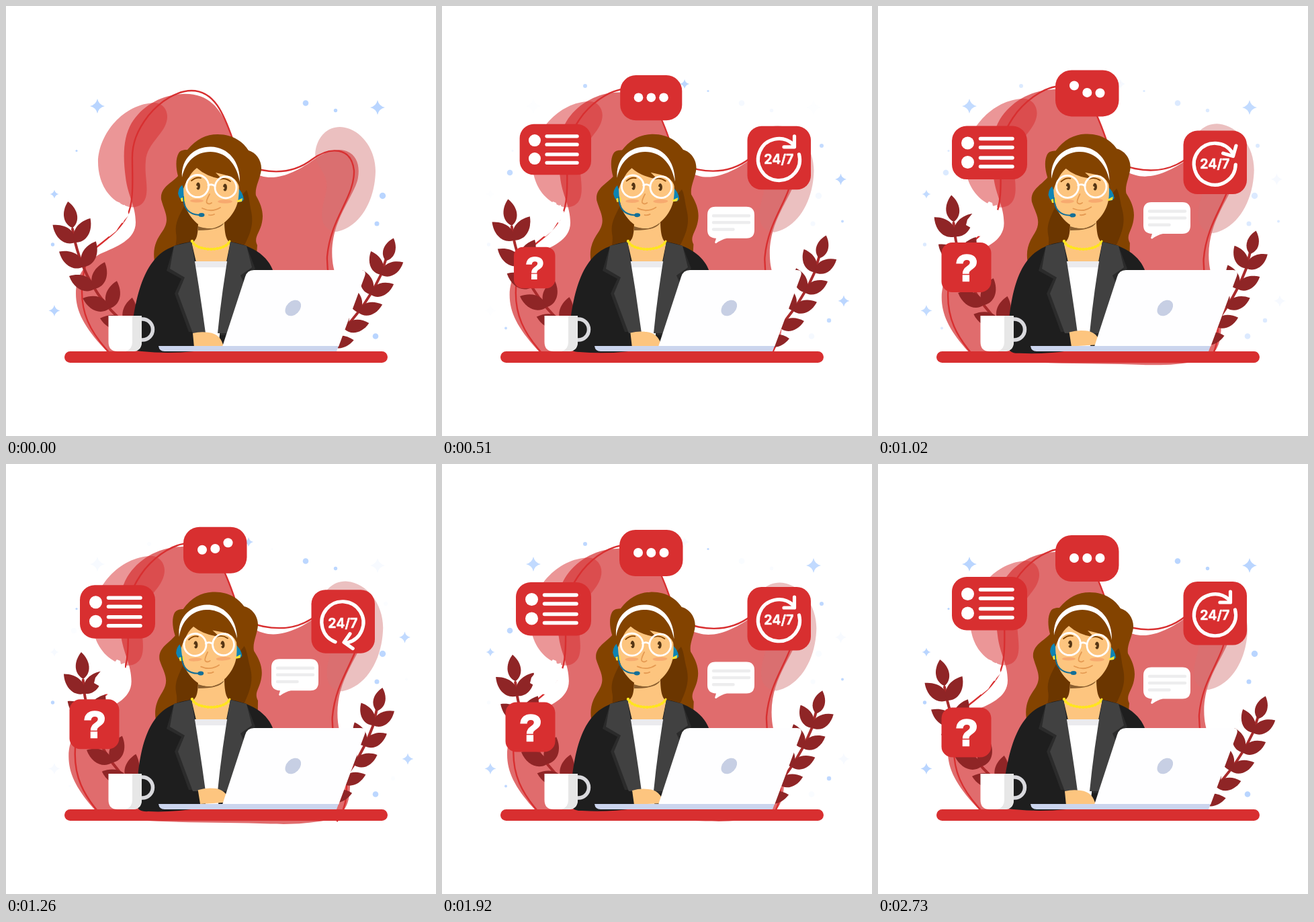
Write an HTML page that moves like this. It is 640 px wide and 640 px high and loops after 2.76 s.

```html
<!DOCTYPE html>
<html lang="en">
<head>
<meta charset="utf-8">
<title>Support desk</title>
<style>
html, body { margin: 0; width: 100%; height: 100%; overflow: hidden; background: #fff; }
svg { display: block; width: 100%; height: 100%; }
.line { fill: none; stroke-linecap: round; stroke-linejoin: round; }
.card { transform-box: fill-box; }
.num { font: 700 19.5px Inter, sans-serif; }
.ask { font: 700 55px "Liberation Sans", sans-serif; }
</style>
</head>
<body>
<svg viewBox="0 0 640 640">
  <defs>
    <path id="star" d="M0-11Q2-2 11 0Q2 2 0 11Q-2 2-11 0Q-2-2 0-11Z"/>
    <path id="leaf" d="M0 0C.2-.33 .65-.33 1 0C.65 .33 .2 .33 0 0Z"/>
  </defs>

  <g id="blob">
    <path fill="#e06c6d" d="M262 131C300 129 318 151 330 180C340 205 350 247 380 253C405 261 436 245 459 228C475 217 487 214 496 214C520 215 529 235 523 260C514 290 480 325 486 380C488 400 502 430 503 462C504 495 497 512 470 519C440 524 420 525 390 524C320 521 220 524 150 514C118 480 104 456 104 428C104 402 118 382 140 369C165 358 193 348 193 322C193 297 181 282 178 255C174 225 174 196 187 174C203 148 232 132 262 131Z"/>
    <path fill="#d82f30" opacity=".5" d="M222 144C235 145 243 158 239 172C234 192 210 205 208 230C206 250 211 265 209 280C207 296 195 301 183 299C150 290 137 260 137 232C138 190 175 145 222 144Z"/>
    <path fill="#d27373" opacity=".45" d="M497 180C525 181 550 210 550 246C549 290 527 329 492 336C473 334 468 320 471 300C475 280 482 268 473 250C464 234 458 228 461 213C465 194 478 180 497 180Z"/>
    <path class="line" stroke="#d82f30" stroke-width="2.3" d="M152 514C123 482 113 456 113 425C113 395 120 373 136 358C156 342 169 333 180 313C191 293 188 255 188 230C187 205 195 185 212 163C230 141 255 126 276 126C310 126 324 160 338 200C346 228 360 240 380 244C410 250 434 245 456 228C482 209 514 209 518 245C519 285 483 315 478 373C477 410 490 430 497 460C501 485 495 505 485 520"/>
  </g>

  <g fill="#b9d5ff">
    <g id="starsA">
      <use href="#star" transform="translate(136 149)"/>
      <use href="#star" transform="translate(553 151)"/>
      <use href="#star" transform="translate(72 280) scale(.6)"/>
      <use href="#star" transform="translate(72 453.5) scale(.77)"/>
    </g>
    <g id="dotsA">
      <circle cx="446" cy="144.5" r="4.3"/><circle cx="490.5" cy="155.5" r="2.7"/>
      <circle cx="105" cy="215.5" r="1.6"/><circle cx="560.5" cy="282.5" r="4.7"/>
      <circle cx="552" cy="324" r="3.5"/><circle cx="69.5" cy="355" r="2.7"/>
      <circle cx="550" cy="491.5" r="4.3"/>
    </g>
    <g id="starsB">
      <use href="#star" transform="translate(361 116) scale(.64)"/>
      <use href="#star" transform="translate(593.5 258) scale(.77)"/>
      <use href="#star" transform="translate(598 439) scale(.77)"/>
    </g>
    <g id="dotsB">
      <circle cx="213" cy="119" r="3"/><circle cx="396" cy="126.5" r="1.6"/>
      <circle cx="565" cy="208" r="3"/><circle cx="101" cy="248" r="4.3"/>
      <circle cx="596" cy="320.5" r="2"/><circle cx="576" cy="468" r="3.2"/>
      <circle cx="95" cy="479.5" r="2"/>
    </g>
  </g>

  <g id="plantL" fill="#8f2526"><path class="line" stroke="#a92b2c" stroke-width="4" d="M99 332L103 352Q122 428 181 476L212 490"/></g>
  <path fill="#fff" d="M133 318L146 302 161 296 165 291 170 293 171 298 177 296 177 303 181 305 183 311 176 319 174 323 172 322 164 335 154 343 146 342 138 330 131 326Z"/>
  <g id="plantR" fill="#8f2526"><path class="line" stroke="#a92b2c" stroke-width="4" d="M567 372L558 400Q529 461 480 502"/></g>

  <g id="hair">
    <path fill="#834300" d="M315 191C340 191 354 204 361 215C372 218 381 230 380 244C378 258 370 270 372 282C380 296 384 308 381 322C378 338 368 344 374 356L372 385H222C217 362 223 349 233 335C245 317 236 307 231 288C229 270 246 264 256 253C252 238 253 226 257 219C260 214 266 214 270 214C283 198 298 191 315 191Z"/>
    <path fill="#6b3600" d="M266 296C258 312 251 322 253 338C255 348 252 358 250 366H350C360 345 370 330 365 306C362 292 362 282 358 274L345 288Z"/>
  </g>

  <path fill="#fdc57f" d="M286 318H325C325 340 328 350 335 353L332 384H280L275 353C285 350 286 338 286 318Z"/>
  <path fill="#8a5f2f" d="M286 328Q308 336 325 322Q320 334 286 334Z"/>
  <path fill="#1e1e1e" d="M276 351C252 354 243 360 235 372V508H400V404C397 382 378 358 334 351L320 420H292Z"/>
  <path fill="#fff" d="M280 380H331L316 506H297Z"/>
  <path fill="#ebebee" d="M280 380H331L330 389H281Z"/>

  <rect x="87" y="514" width="481" height="17" rx="8.5" fill="#d82f30"/>
  <path id="arm" fill="#1e1e1e" d="M252 357C208 370 192 425 185 502Q186 514 202 514Q240 518 280 514L278 484 270 440 264 400Z"/>
  <path fill="#2b2b2b" d="M250 357L239 394 261 406 251 428 272 485H290L276 351ZM358 357L371 391 356 402 360 420 340 490H318L334 351Z"/>
  <path fill="#414141" d="M276 351L250 357 244 391 266 404 256 428 278 487H297Q288 420 276 351ZM334 351L358 357 366 389 349 401 358 422 334 487H315Q321 425 334 351Z"/>
  <path id="hand" fill="#fdc57f" d="M278 487Q290 484 302 486Q320 488 324 508H280Z"/>
  <g class="line" stroke="#ffe51f">
    <path stroke-width="3" d="M277 350Q282 361 305 362Q328 361 333 350"/>
    <path stroke-width="4.4" stroke-dasharray="0 4.6" d="M277 350Q282 361 305 362Q328 361 333 350"/>
  </g>

  <g id="head">
    <path fill="#0d84b4" d="M266 264Q257 268 256 279Q258 290 267 291ZM344 270Q353 277 354 288Q350 294 343 290Z"/>
    <path fill="#fdc57f" d="M265 256C263 275 264 298 274 312C283 325 294 332 307 331C324 328 344 308 346 285Q348 268 345 258Q330 238 300 238Q270 240 265 256Z"/>
    <path fill="#834300" d="M260 260C262 230 275 213 304 212C333 213 350 236 349 275Q346 260 335 254Q325 251 312 248L322 258Q298 254 284 241Q275 248 271 258Q266 265 264 272Z"/>
    <path fill="#fff" d="M262 255C260 226 282 209 305 209.5C331 210 349 232 348 262C343 233 326 217 304 217C283 217 267 231 262 255Z"/>
    <g fill="#f6a56c" opacity=".85"><ellipse cx="284" cy="290" rx="10" ry="2.6"/><ellipse cx="326" cy="291" rx="11" ry="2.8"/></g>
    <g fill="#553615"><ellipse cx="286" cy="268" rx="3" ry="5.5"/><ellipse cx="326" cy="270" rx="3" ry="5.5"/></g>
    <g fill="#fdc57f"><circle cx="283.5" cy="269" r="1.8"/><circle cx="323.5" cy="271" r="1.8"/></g>
    <path class="line" stroke="#834300" stroke-width="1.8" d="M276 260Q283 254 290 256M318 258Q326 255 334 261"/>
    <path class="line" stroke="#e59a52" stroke-width="1.8" d="M303 280Q297 291 299 293Q302 296 306 293M292 301Q306 308 319 300M302 311Q306 312 310 310"/>
    <g class="line" stroke="#fff" stroke-width="2.8"><circle cx="285" cy="268" r="16.5"/><circle cx="327" cy="270" r="16"/><path d="M301 267Q306 264 311 268"/></g>
    <path fill="#ffe436" d="M260 286L267 284V291H261ZM343 290L352 286 351 291 345 292Z"/>
    <path class="line" stroke="#126f98" stroke-width="2" d="M264 284C264 303 273 310 287 311"/>
    <ellipse cx="291" cy="311" rx="4.5" ry="3" fill="#126f98"/>
  </g>

  <path fill="#fefeff" d="M322 507L356 403Q359 393 369 393H528Q537 393 534 402L495 507Z"/>
  <ellipse cx="427.3" cy="449.5" rx="13.5" ry="9.8" transform="rotate(-45 427.3 449.5)" fill="#c7cfe4"/>
  <path fill="#cbd5ee" d="M227 506H495L492 514H236Q228 514 227 506Z"/>

  <path class="line" stroke="#d9d9dd" stroke-width="5.5" d="M201 466H203A15.5 15.5 0 0 1 203 497H201"/>
  <path fill="#fff" d="M152.5 461H202V500Q202 514 188 514H166Q152.5 514 152.5 500Z"/>
  <path fill="#e7e7e7" d="M188 461H202V500Q202 514 186 514H178Q188 511 188 500Z"/>

  <g class="card" data-drift="-1" data-delay="80" style="transform-origin: 50% 50%">
    <rect x="264" y="106" width="94.5" height="69" rx="24" fill="#d82f30"/>
    <g fill="#fff"><circle class="dot" cx="292" cy="140" r="7"/><circle class="dot" cx="311.3" cy="140" r="7"/><circle class="dot" cx="330.5" cy="140" r="7"/></g>
  </g>
  <g class="card" data-drift="1" data-delay="100" style="transform-origin: 100% 100%">
    <rect x="110" y="168" width="112" height="79.5" rx="22" fill="#d82f30"/>
    <circle cx="133.5" cy="193.5" r="9.5" fill="#fff"/><circle cx="133.5" cy="222" r="9.5" fill="#fff"/>
    <path class="line" stroke="#fff" stroke-width="5.5" d="M152.500 187H200M152.500 200H200M152.500 215.500H200M152.500 228.500H200"/>
  </g>
  <g class="card" data-drift="1" data-delay="30" style="transform-origin: 0 100%">
    <rect x="454.5" y="175" width="94.5" height="94.5" rx="21" fill="#d82f30"/>
    <g id="ring" class="line" stroke="#fff" stroke-width="5.2"><path d="M531.500 217A31 31 0 1 1 522 201.500M524.500 190V206H509"/></g>
    <text class="num" x="501.3" y="231.5" text-anchor="middle" fill="#fff" stroke="#fff" stroke-width=".5">24/7</text>
  </g>
  <g class="card" data-drift="-1" data-delay="30" style="transform-origin: 0 100%">
    <path fill="#fff" d="M407 302.500H453Q465 302.500 465 315V337Q465 349.500 453 349.500H424Q416 351 408 357Q405 357 407 353L408 349.500Q395 349 395 337V315Q395 302.500 407 302.500Z"/>
    <path class="line" stroke="#ededee" stroke-width="4.5" d="M404 316H457M404 326H457M404 336.300H433.500"/>
  </g>
  <g class="card" data-drift="-1" data-delay="160" style="transform-origin: 100% 0">
    <rect x="94.5" y="362.5" width="74" height="74" rx="16" fill="#d82f30"/>
    <text class="ask" x="132" y="419.5" text-anchor="middle" fill="#fff" stroke="#fff" stroke-width="2.6">?</text>
  </g>
</svg>
<script>
const LOOP = 2760, SPAN = 2730;
const $ = id => document.getElementById(id);
const turn = (id, angle, x, y) => $(id).setAttribute('transform', `rotate(${angle} ${x} ${y})`);
const wave = (t, period) => (1 - Math.cos(2 * Math.PI * t / period)) / 2;
const ease = p => (1 - Math.cos(Math.PI * Math.min(1, Math.max(0, p)))) / 2;

const leaf = (x, y, angle, size) =>
  `<use href="#leaf" transform="translate(${x} ${y}) rotate(${angle}) scale(${size})"/>`;

// Pairs of leaves along the curved stem, fanning out towards its foot
function grow(id, from, bend, to, heading, fan, size) {
  const at = (u, k) => (1 - u) ** 2 * from[k] + 2 * u * (1 - u) * bend[k] + u * u * to[k];
  const a = heading * Math.PI / 180;
  let leaves = leaf(from[0] + 22 * Math.cos(a), from[1] + 22 * Math.sin(a), heading, size * .94);
  for (let i = 0; i < 5; i++) {
    const x = at(i / 4, 0), y = at(i / 4, 1), h = heading + fan * i;
    leaves += leaf(x, y, h - 42, size) + leaf(x, y, h + 42, size);
  }
  $(id).insertAdjacentHTML('beforeend', leaves);
}
grow('plantL', [103, 352], [122, 428], [181, 476], -100, -5.7, 42.5);
grow('plantR', [558, 400], [529, 461], [480, 502], -71, 5.5, 38);

const cards = [...document.querySelectorAll('.card')];
const bubbles = [...document.querySelectorAll('.dot')];

function hop(t, start) {
  const p = (t - start) / 300;
  return p > 0 && p < 1 ? -11 * Math.sin(Math.PI * p) ** 2 : 0;
}

function draw(t) {
  const sway = wave(t, SPAN);
  $('blob').setAttribute('transform', `translate(322 290) scale(${1 + .05 * sway}) translate(-322 -290)`);
  turn('plantL', 5.6 * sway, 215, 490);
  turn('plantR', -5.2 * sway, 430, 523);
  for (const id of ['hair', 'head']) turn(id, -3.1 * sway, 302, 335);
  for (const id of ['arm', 'hand']) turn(id, -3.7 * sway, 255, 365);

  const stars = wave(t, SPAN / 3), dots = wave(t, SPAN / 2);
  $('starsA').style.opacity = 1 - stars;
  $('starsB').style.opacity = stars;
  $('dotsA').style.opacity = 1 - dots;
  $('dotsB').style.opacity = dots;

  for (const card of cards) {
    const { drift, delay } = card.dataset;
    card.style.transform = `translateY(${12.4 * drift * sway}px) scale(${ease((t - delay) / 480)})`;
  }
  bubbles.forEach((b, i) => {
    const lag = 130 * i;
    b.setAttribute('transform', `translate(0 ${hop(t, 870 + lag) + hop(t, 1922 + lag)})`);
  });
  turn('ring', 360 * ease((t - 900) / 900), 501.5, 224);
}

const begin = performance.now();
function tick() {
  draw((performance.now() - begin) % LOOP);
  requestAnimationFrame(tick);
}
draw(0);
requestAnimationFrame(tick);
</script>
</body>
</html>
```
